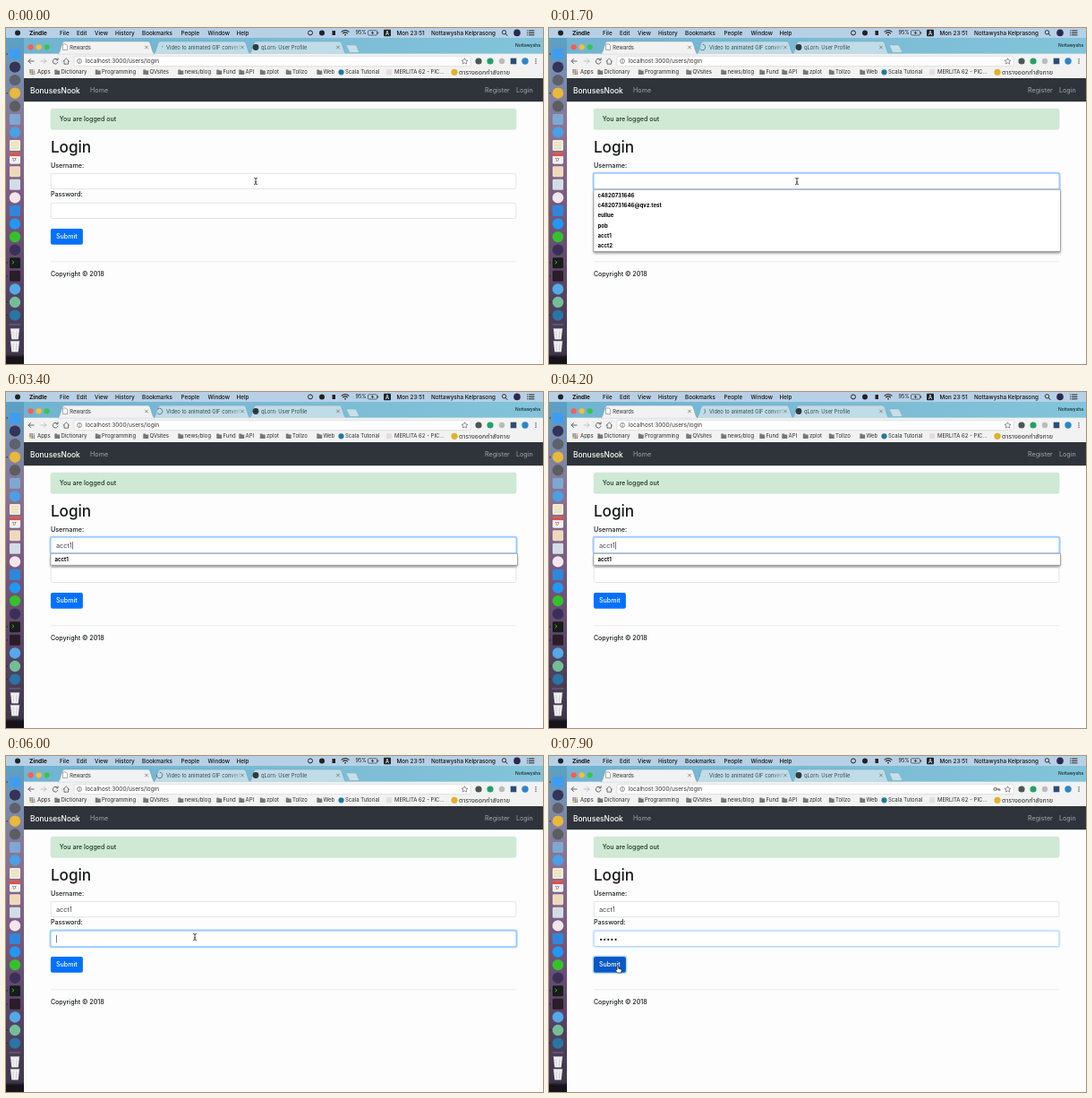
These frames come from a looping animation (600x375 px, 8000 ms). An HTML page:

```html
<!DOCTYPE html>
<html lang="en">
<head>
<meta charset="utf-8">
<title>Login demo</title>
<style>
  html, body { margin: 0; width: 100%; height: 100%; overflow: hidden; background: #fff; }
  svg { display: block; width: 100vw; height: 100vh; }
  text { font-family: Inter, "Noto Sans", "Noto Sans Thai", sans-serif; white-space: pre; }
</style>
</head>
<body>
<svg id="stage" viewBox="0 0 600 375">
  <defs>
    <linearGradient id="dock" x1="0" y1="0" x2="0" y2="1">
      <stop offset="0" stop-color="#5aa2c6"/>
      <stop offset=".12" stop-color="#7a8cac"/>
      <stop offset=".3" stop-color="#8c7090"/>
      <stop offset=".55" stop-color="#73567b"/>
      <stop offset=".8" stop-color="#524260"/>
      <stop offset=".97" stop-color="#40364a"/>
      <stop offset=".98" stop-color="#17131b"/>
    </linearGradient>
    <linearGradient id="strip" x1="0" y1="0" x2="1" y2="0">
      <stop offset="0" stop-color="#72b3d1"/>
      <stop offset="1" stop-color="#82c4d9"/>
    </linearGradient>
    <linearGradient id="titleFade" x1="0" y1="0" x2="1" y2="0">
      <stop offset=".85" stop-color="#3c474d"/>
      <stop offset="1" stop-color="#3c474d" stop-opacity=".15"/>
    </linearGradient>
    <clipPath id="titleClip"><rect x="176" y="14" width="86" height="15"/></clipPath>
    <filter id="soft" x="-5%" y="-30%" width="110%" height="180%"><feGaussianBlur stdDeviation="1.6"/></filter>
  </defs>
</svg>
<script>
const LOOP = 8000, STEP = 100;
const LEFT = 49.9, WIDTH = 520.3, CONTROL = 17.8;
const INK = '#16191c';
const stage = document.getElementById('stage');

function set(el, attrs) {
  for (const key in attrs) el.setAttribute(key, attrs[key]);
  return el;
}
function add(tag, attrs, parent = stage) {
  return parent.appendChild(set(document.createElementNS('http://www.w3.org/2000/svg', tag), attrs));
}
const rect = (x, y, width, height, fill, more, parent) => add('rect', { x, y, width, height, fill, ...more }, parent);
const dot = (cx, cy, r, fill, more, parent) => add('circle', { cx, cy, r, fill, ...more }, parent);
const path = (d, fill, more, parent) => add('path', { d, fill, ...more }, parent);
const line = (d, stroke, width = 0.9, more, parent) =>
  path(d, 'none', { stroke, 'stroke-width': width, 'stroke-linecap': 'round', 'stroke-linejoin': 'round', ...more }, parent);
// Text is placed by its left edge and vertical centre.
function text(label, x, middle, size, fill = INK, more, parent) {
  const el = add('text', { x, y: middle + size * 0.36, 'font-size': size, fill, ...more }, parent);
  el.textContent = label;
  return el;
}
const show = (el, on) => el.setAttribute('display', on ? 'inline' : 'none');
const MEDIUM = { 'font-weight': 500 };

function drawMenuBar() {
  rect(0, 0, 600, 11, '#b8d0e6');
  dot(13, 5.4, 3, '#1d2529');
  text('Zindle', 26, 5.4, 6.5, '#111', { 'font-weight': 700 });
  const items = [['File', 60], ['Edit', 79], ['View', 99], ['History', 122], ['Bookmarks', 152],
    ['People', 195.5], ['Window', 225.5], ['Help', 257.5], ['Mon 23:51', 436.5], ['Nottawysha Kelprasong', 475]];
  for (const [label, x] of items) text(label, x, 5.4, 6.3, '#111', MEDIUM);
  text('95%', 390.5, 5.4, 5.6, '#111');
  dot(340, 5.4, 2.5, 'none', { stroke: '#222', 'stroke-width': 1 });
  dot(353, 5.4, 3, '#222');
  rect(364.5, 3, 3.5, 5, '#222');
  line('M375 4.2Q379 .8 383 4.2M376.5 5.9Q379 3.8 381.5 5.9', '#222', 1.1);
  dot(379, 7.6, 0.9, '#222');
  rect(404.5, 2.8, 10, 5.2, 'none', { stroke: '#222', 'stroke-width': 0.6, rx: 1 });
  path('M410 3.2l-2.2 2.6h1.6l-.4 1.8 2.2-2.6h-1.6z', '#222');
  rect(415.2, 4.5, 0.9, 2, '#222');
  rect(422, 1.8, 8, 7.4, '#202428', { rx: 1 });
  text('A', 424, 5.5, 5.6, '#e8f2f5', { 'font-weight': 600 });
  dot(556.5, 4.8, 2.2, 'none', { stroke: '#222', 'stroke-width': 0.9 });
  line('M558.2 6.5L560 8.5', '#222', 1);
  dot(571, 5.4, 3.8, '#2c2950');
  for (const y of [3, 5.4, 7.8]) line(`M582.5 ${y}h.4M584.5 ${y}h5.5`, '#222', 1);
}

function drawDock() {
  rect(0, 11, 20, 364, 'url(#dock)');
  const colours = ['#3f9df0', '#34335a', '#5d616d', '#e8b93a', '#5b5d60', '#7fa8d0', '#4aa0e4', '#f3ecd2',
    '#f4f1f1', '#eed9bd', '#d3dde8', '#f3e6ee', '#2f87dc', '#2397f1', '#34c22c', '#3b2f5a',
    '#181c1a', '#2b1c2b', '#54a9e6', '#74bd98', '#2a74a6'];
  const square = new Set([0, 5, 7, 8, 9, 10, 12, 16, 17]);
  colours.forEach((fill, i) => {
    const y = 29 + i * 14.58;
    if (square.has(i)) rect(4, y - 6, 12, 12, fill, { rx: 1.4 });
    else dot(10, y, 6.2, fill);
  });
  rect(4, 139.6, 12, 3.5, '#dc5147');
  for (const y of [128, 131, 134]) line(`M6.5 ${y}h7`, '#c9bda0', 0.5);
  text('17', 6.8, 147.2, 5, '#444');
  line('M7 260l2 1.5l-2 1.5', '#43c54d', 0.8);
  for (const y of [29, 72.7, 262, 277, 306, 320.5]) dot(1.2, y, 0.7, '#20242c');
  line('M4 331h12', '#a698ad', 0.5);
  for (const y of [341.5, 355.5]) {
    path(`M5 ${y - 6}h10l-1.3 12h-7.4z`, '#eef0f2');
    line(`M5 ${y - 6}h10M8 ${y - 3}l.4 7M12 ${y - 3}l-.4 7`, '#b5b9bf', 0.6);
  }
}

function drawTab(x, width, fill) {
  const right = x + width;
  path(`M${x} 29C${x + 3} 28 ${x + 4} 15 ${x + 7} 15H${right - 7}C${right - 4} 15 ${right - 3} 28 ${right} 29Z`,
    fill, { stroke: '#6f9db2', 'stroke-width': 0.5 });
  const c = right - 9;
  line(`M${c - 1.5} 20l3 3m0-3l-3 3`, '#5d676c', 0.7);
}

function drawTabs() {
  rect(20, 11, 580, 18, 'url(#strip)');
  ['#fb5d57', '#fcbd3a', '#34c74a'].forEach((fill, i) => dot(27.6 + i * 9, 21.3, 3.1, fill));
  drawTab(272, 108, '#c0dce8');
  drawTab(165, 108, '#c0dce8');
  rect(20, 28.7, 580, 27.3, '#f2f2f2');
  drawTab(58, 108, '#f2f2f2');
  rect(59, 28.2, 106, 1.2, '#f2f2f2');
  path('M380 19h11l4 8.5h-11z', '#c6dfe9', { stroke: '#78a7b9', 'stroke-width': 0.5 });
  path('M63.5 18h3.5l1.5 1.5v5h-5z', '#fff', { stroke: '#777', 'stroke-width': 0.6 });
  text('Rewards', 71.3, 21.5, 5.8, '#333');
  text('Video to animated GIF convert', 179, 21.5, 5.8, 'url(#titleFade)', { 'clip-path': 'url(#titleClip)' });
  dot(279, 21.5, 3.4, '#34383c');
  text('qLorn: User Profile', 285, 21.5, 5.8, '#3c474d');
  text('Nottawysha', 569, 19.5, 4.9, '#16242a', MEDIUM);
}

function drawToolbar() {
  line('M31 37h-6m2.5-2.5L25 37l2.5 2.5', '#555');
  line('M39 37h6m-2.5-2.5L45 37l-2.5 2.5', '#bbb');
  line('M57.3 35.2A2.9 2.9 0 1 0 58 38M58 33.8v2h-2', '#555');
  line('M64 37.2L67.3 34l3.3 3.2M65 36.8v3.4h4.6v-3.4', '#555', 0.8);
  rect(76, 31.4, 443, 11.2, '#fff', { rx: 1.5, stroke: '#c9c9c9', 'stroke-width': 0.5 });
  dot(82, 37, 2.5, 'none', { stroke: '#666', 'stroke-width': 0.7 });
  line('M82 36.8v1.6M82 35.5v.1', '#666', 0.7);
  text('localhost:3000/users/login', 88.6, 37, 6.5, '#333');
  path('M512.5 33.7l1 2.3 2.5.2-1.9 1.6.6 2.4-2.2-1.3-2.2 1.3.6-2.4-1.9-1.6 2.5-.2z', 'none',
    { stroke: '#555', 'stroke-width': 0.6 });
  dot(528, 37, 3.6, '#4c5558');
  dot(541, 37, 3.6, '#24a06b');
  dot(554, 37, 3.2, '#b9bcbd');
  rect(563.7, 33.7, 6.6, 6.6, '#2b4c74');
  dot(580, 37, 3.7, '#2d86c9');
  for (const y of [34.7, 37, 39.3]) dot(592, y, 0.75, '#555');
}

function drawBookmarks() {
  const tints = ['#dd5144', '#4c8bf5', '#ecb12f', '#1da462'];
  for (let i = 0; i < 9; i++) rect(26.3 + i % 3 * 2.1, 46.2 + Math.floor(i / 3) * 2.1, 1.6, 1.6, tints[i % 4]);
  const labels = [['Apps', 35], ['Dictionary', 61.5], ['Programming', 107], ['QVsites', 160.5], ['news/blog', 199.5],
    ['Fund', 242.5], ['API', 267.5], ['zplot', 291], ['Tollzo', 320], ['Web', 354.5], ['Scala Tutorial', 379],
    ['MERLITA 62 - PIC...', 434]];
  labels.forEach(([label, x], i) => {
    text(label, x, 49.2, 6, '#2b2b2b');
    if (i > 0 && i < 10) path(`M${x - 7.2} 46.6h2.4l.7.9h2.8v4.4h-5.9z`, '#777');
  });
  text('ตารางออกกำลังกาย', 506, 49, 7.2, '#2b2b2b');
  dot(374.5, 49.3, 3.1, '#24799a');
  rect(425, 46.2, 6, 6, '#e4dce0');
  dot(501, 49.3, 3.6, '#dfb32c');
}

function drawPage() {
  rect(20, 56, 580, 319, '#fdfdfd');
  rect(20, 56, 580, 26.2, '#2f343a');
  text('BonusesNook', 27, 69.6, 8.4, '#fff', MEDIUM);
  text('Home', 94, 69.8, 7.2, '#a4a7a9');
  text('Register', 535, 69.8, 7.2, '#a4a7a9');
  text('Login', 570, 69.8, 7.2, '#a4a7a9');
  rect(LEFT + 0.2, 90.2, WIDTH - 0.4, 23, '#cfe9d5', { rx: 2, stroke: '#bfe0c7', 'stroke-width': 0.5 });
  text('You are logged out', 59.8, 101.8, 7.05, '#16351f', MEDIUM);
  text('Login', LEFT, 132.8, 17.1, INK, MEDIUM);
  text('Username:', LEFT, 153, 7.15, INK, MEDIUM);
  text('Password:', LEFT, 185.8, 7.15, INK, MEDIUM);
  rect(LEFT, 260.6, WIDTH, 0.6, '#dedede');
  text('Copyright © 2018', LEFT, 274.2, 7.05, INK, MEDIUM);
}

function makeField(y) {
  const halo = rect(LEFT - 0.6, y - 0.6, WIDTH + 1.2, CONTROL + 1.2, 'none',
    { rx: 2.5, stroke: '#007bff', 'stroke-width': 1.6 });
  const box = rect(LEFT + 0.3, y + 0.3, WIDTH - 0.6, CONTROL - 0.6, '#fff', { rx: 2, 'stroke-width': 0.6 });
  const label = text('', 56, y + 9, 7.3);
  const caret = rect(56, y + 5, 0.6, 8.4, '#222');
  return { halo, box, label, caret };
}

function updateField(field, value, border, glow, caretOn, fill = '#fff') {
  set(field.halo, { opacity: 0.36 * glow });
  set(field.box, { fill, stroke: border > 0.5 ? '#80bdff' : '#ced4da' });
  if (field.label.textContent !== value) field.label.textContent = value;
  const width = value ? field.label.getComputedTextLength() : 0;
  set(field.caret, { x: 56.3 + width });
  show(field.caret, caretOn);
}

drawMenuBar();
drawTabs();
drawToolbar();
drawBookmarks();
drawPage();
drawDock();

const spinner = line('', '#68777f', 1);
const keyIcon = add('g', {});
dot(498.5, 37, 1.6, 'none', { stroke: '#555', 'stroke-width': 1 }, keyIcon);
line('M500.2 37h3.6v1.4M502.2 37v1.2', '#555', 0.9, {}, keyIcon);

const username = makeField(162.1), password = makeField(195);
const buttonHalo = rect(LEFT - 0.7, 223.3, 37.4, CONTROL + 1.4, 'none',
  { rx: 2.6, stroke: '#007bff', 'stroke-width': 1.5 });
const button = rect(LEFT, 224, 36, CONTROL, '#0071ff', { rx: 2 });
text('Submit', 56, 232.9, 7.1, '#fff', MEDIUM);

const menu = add('g', {});
const menuShadow = rect(LEFT, 182, WIDTH + 1, 10, '#000', { opacity: 0.45, filter: 'url(#soft)' }, menu);
const menuBox = rect(LEFT, 180.2, WIDTH + 1.2, 10, '#fff', { stroke: '#8c8c8c', 'stroke-width': 0.7 }, menu);
const menuHover = rect(LEFT + 0.5, 181, WIDTH + 0.2, 11.4, '#ebebeb', {}, menu);
const accounts = ['c4820731646', 'c4820731646@qvz.test', 'eullue', 'pob', 'acct1', 'acct2'];
const rows = accounts.map((_, i) => text('', 54.5, 186.8 + i * 11.25, 6, '#000', { 'font-weight': 700 }, menu));

const beam = add('g', {});
const beamShape = 'M-1.5-3.6Q0-3.6 0-2.6Q0-3.6 1.5-3.6M0-2.6V2.6M-1.5 3.6Q0 3.6 0 2.6Q0 3.6 1.5 3.6M-.7.9H.7';
line(beamShape, '#fff', 1.6, { opacity: 0.7 }, beam);
line(beamShape, '#222', 0.8, {}, beam);
const arrow = path('M0 0v8l1.9-1.7 1.3 2.9 1.3-.6-1.3-2.8h2.5z', '#111', { stroke: '#fff', 'stroke-width': 0.6 });
const hand = path('M-1-3.6Q0-4.6.7-3.6V-.8l2.8.8q.8.3.7 1.3L3.6 4H-.6L-3 .9q-.2-1 .8-.8L-1 1z', '#fff',
  { stroke: '#111', 'stroke-width': 0.7, 'stroke-linejoin': 'round' });

const clamp = v => Math.max(0, Math.min(1, v));
const mix = (a, b, k) => a + (b - a) * k;
const fade = (t, start) => clamp((t - start) / 150);

// Cubic easing with control points (.4, 0) and (.2, 1).
function ease(x) {
  let low = 0, high = 1, s = 0.5;
  for (let i = 0; i < 14; i++) {
    s = (low + high) / 2;
    const r = 1 - s;
    if (1.2 * r * r * s + 0.6 * r * s * s + s * s * s < x) low = s; else high = s;
  }
  return s * s * (3 - 2 * s);
}

const FOCUS_USER = 900, OPEN = 1200, HOVER = 5100, PICK = 5500, FOCUS_PASS = 5800, PRESS = 7800;
const userKeys = [2000, 2200, 2400, 2600, 3200];
const passKeys = [6400, 6550, 6700, 6850, 7000];
const pointer = [[0, 279, 171], [600, 277, 171], [4700, 277, 171], [5200, 250, 197], [5500, 250, 197],
  [5800, 211, 202], [7100, 211, 202], [7600, 77, 238], [8000, 77, 238]];

function pointerAt(t) {
  const i = Math.max(1, pointer.findIndex(p => p[0] > t));
  const [a, b] = [pointer[i - 1], pointer[i]];
  const k = clamp((t - a[0]) / (b[0] - a[0])), e = k * k * (3 - 2 * k);
  return [mix(a[1], b[1], e), mix(a[2], b[2], e)];
}
const typed = (keys, t) => keys.filter(k => k <= t).length;

function caretVisible(t, focusTime, keys) {
  const last = keys.filter(k => k <= t).pop() || focusTime;
  return (t - last) % 1000 < 500;
}

function drawSpinner(t) {
  const arc = 4000 / 3 / 2, phase = Math.floor(t / arc);
  const grown = 270 * ease(t / arc - phase);
  const start = 342 + 360 * t / 1568 + 270 * Math.floor((phase + 1) / 2);
  const sweep = phase % 2 ? grown - 270 : grown;
  const end = start + (Math.abs(sweep) < 8 ? (sweep < 0 ? -8 : 8) : sweep);
  const point = deg => {
    const a = deg * Math.PI / 180;
    return `${171.5 + 3.3 * Math.cos(a)} ${21.5 + 3.3 * Math.sin(a)}`;
  };
  set(spinner, { d: `M${point(start)}A3.3 3.3 0 ${Math.abs(sweep) > 180 ? 1 : 0} ${end > start ? 1 : 0} ${point(end)}` });
}

function drawMenu(t, value) {
  const open = t >= OPEN && t < PICK;
  show(menu, open);
  if (!open) return;
  const matches = accounts.filter(a => a.startsWith(value));
  const height = 11.25 * matches.length + 1.8;
  set(menuBox, { height });
  set(menuShadow, { height });
  show(menuHover, t >= HOVER);
  rows.forEach((row, i) => { row.textContent = matches[i] || ''; });
}

function drawPointer(t) {
  const [x, y] = pointerAt(t);
  const hidden = (t >= 2000 && t < 4700) || (t >= 6400 && t < 7100);
  const overButton = x < 86 && y > 224;
  const overField = y < 213;
  show(beam, !hidden && overField);
  show(arrow, !hidden && !overField && !overButton);
  show(hand, !hidden && overButton);
  for (const el of [beam, arrow, hand]) set(el, { transform: `translate(${x} ${y})` });
  return overButton;
}

function render(t) {
  drawSpinner(t);
  const value = 'acct1'.slice(0, typed(userKeys, t));
  const preview = t >= HOVER && t < PICK;
  const userGlow = fade(t, FOCUS_USER) * (1 - fade(t, FOCUS_PASS));
  updateField(username, value, userGlow, userGlow,
    t >= FOCUS_USER && t < HOVER && caretVisible(t, FOCUS_USER, userKeys), preview ? '#dde6a8' : '#fff');
  set(username.label, { fill: preview ? '#111' : '#41474d' });

  const passGlow = fade(t, FOCUS_PASS) * (1 - fade(t, PRESS));
  updateField(password, '•'.repeat(typed(passKeys, t)), t < PRESS ? passGlow : 1, passGlow,
    t >= FOCUS_PASS && t < PRESS && caretVisible(t, FOCUS_PASS, passKeys));
  show(keyIcon, t >= passKeys[0]);
  drawMenu(t, value);

  const over = drawPointer(t);
  set(button, { fill: t >= PRESS ? '#0a58c6' : over ? '#0062d9' : '#0071ff' });
  set(buttonHalo, { opacity: 0.4 * fade(t, PRESS) });
}

const began = performance.now();
function tick() {
  const t = (performance.now() - began) % LOOP;
  render(Math.floor(t / STEP) * STEP);
  requestAnimationFrame(tick);
}
tick();
</script>
</body>
</html>
```
